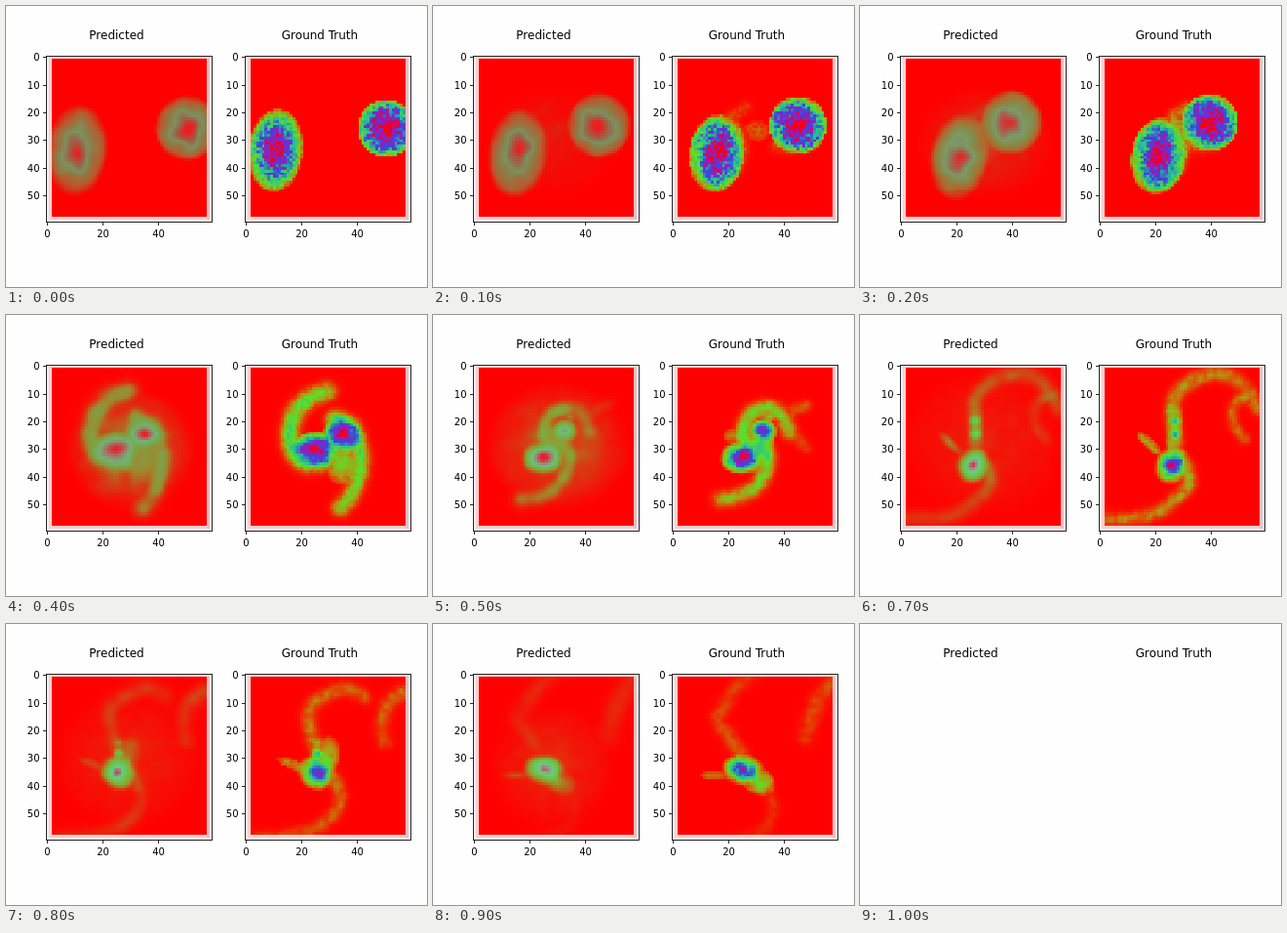
Recreate the animation shown at these times as an HTML page with a canvas. Size 432 by 288 pixels, loop 1.16 s.

```html
<!DOCTYPE html>
<html lang="en">
<head>
<meta charset="utf-8">
<title>Predicted and ground truth</title>
<style>
html, body { margin: 0; width: 100%; height: 100%; overflow: hidden; background: #fefefe; }
canvas { display: block; }
</style>
</head>
<body>
<canvas id="stage" width="432" height="288"></canvas>
<script>
const ctx = document.getElementById('stage').getContext('2d');
const N = 60, SIZE = 170, CELL = SIZE / N;
const STEP = 100, STEPS = 10, LOOP = 1160;
const KEY_STEPS = [0, 2, 4, 6, 7, 9];

// Bodies: cx, cy, rx, ry, tilt, peak, falloff
const core = [
  [10.5, 33.5, 10, 15, 0.1, 1, 0.6],
  [21, 35.5, 10, 14.5, 0.18, 1, 0.6],
  [24.5, 30, 9, 6.5, -0.1, 1, 0.6],
  [25.2, 35.7, 7.5, 6, 0, 1, 1.1],
  [26, 35.5, 6.5, 7.5, 0.5, 1, 1.1],
  [25.2, 34, 8, 6, 0.2, 0.88, 1]
];
const mate = [
  [50.5, 25.5, 10.5, 10.5, 0, 1, 0.42],
  [39.5, 23.5, 10.5, 10.5, 0, 1, 0.45],
  [35, 24.5, 7.5, 6, 0.4, 1, 0.6],
  [30, 22, 2.8, 2.8, 0, 0.72, 0.8],
  [26.7, 24.3, 2.5, 2.5, 0, 0.65, 0.8],
  [25, 32, 3, 3, 0, 0.3, 0.8]
];
const knot = [
  [50, 20, 2, 2, 0, 0, 0.8],
  [42, 20, 2, 2, 0, 0, 0.8],
  [38, 20, 2, 2, 0, 0, 0.8],
  [31, 16.5, 2.8, 2.6, 0, 0.62, 0.8],
  [26.4, 19.5, 2.5, 2.5, 0, 0.55, 0.8],
  [25, 29, 2, 2, 0, 0, 0.8]
];
const bridge = [
  [30, 28, 5, 4, 0, 0, 0.5],
  [30, 25, 5, 4, 0, 0.2, 0.5],
  [35, 34, 7, 9, 0, 0.3, 0.5],
  [26.5, 26, 5.5, 9, 0.3, 0.34, 0.5],
  [26.5, 22, 3.4, 12, 0, 0.27, 0.5],
  [30.5, 38, 7, 5, 0.5, 0.32, 0.6]
];
const wisp = [
  [20, 30, 3, 3, 0, 0, 0.5],
  [20, 30, 3, 3, 0, 0, 0.5],
  [22, 26, 3, 3, 0, 0, 0.5],
  [21, 24, 4.2, 3, 0.2, 0.32, 0.5],
  [17.8, 28, 6, 2, 0.75, 0.25, 0.5],
  [15, 36, 6, 1.8, 0, 0.15, 0.5]
];
const halo = [
  [25, 30, 22, 18, 0, 0, 0.7],
  [30, 31, 22, 18, 0, 0.16, 0.7],
  [30, 30, 21, 20, 0, 0.36, 0.8],
  [30, 28, 26, 22, 0, 0.08, 0.6],
  [30, 28, 26, 24, 0, 0.07, 0.6],
  [28, 33, 20, 20, 0, 0.09, 0.6]
];

// Arms: x, y pairs from root to tip, then width and peak
const upperArm = [
  [18, 40, 20, 33, 18, 26, 16, 22, 18, 20, 21, 18, 2, 0],
  [28, 40, 30, 33, 28, 26, 26, 22, 28, 20, 31, 18, 2, 0.22],
  [28, 34, 20, 34, 16, 27, 17, 18, 22, 12, 29, 9, 3, 0.48],
  [27, 30, 30, 16, 39, 8.5, 49, 12, 55, 22, 55, 38, 2.2, 0.3],
  [27, 27, 26, 14, 31, 6.5, 41, 2.5, 50, 5.5, 57, 15, 2.5, 0.21],
  [24, 28, 20, 22, 16, 16, 19, 10, 23, 4, 28, 0, 2.5, 0.1]
];
const lowerArm = [
  [49, 20, 55, 22, 57, 27, 54, 32, 47, 34, 42, 33, 2, 0],
  [38, 18, 44, 20, 46, 25, 43, 30, 36, 32, 31, 31, 2, 0.2],
  [32, 19, 38, 22, 41, 30, 41, 38, 38, 46, 34, 51, 2.8, 0.46],
  [30, 36, 30, 42, 25, 47, 17, 50, 8, 48, 0, 45, 2.3, 0.27],
  [31, 36, 32, 42, 28, 47, 21, 52.5, 11, 55, 0, 55, 2.3, 0.21],
  [32, 38, 36, 46, 34, 54, 28, 58, 18, 61, 8, 63, 2.3, 0.05]
];
const sideArm = [
  [44, 14, 40, 16, 40, 22, 44, 28, 2, 0],
  [44, 14, 40, 16, 40, 22, 44, 28, 2, 0],
  [44, 14, 40, 16, 40, 22, 44, 28, 2, 0],
  [52, 14, 46, 17, 46, 24, 52, 31, 1.8, 0.23],
  [55, 10, 49, 13, 48, 20, 52, 26, 2, 0.16],
  [58, 2, 53, 8, 50, 15, 48, 22, 3, 0.1]
];

// Colour ramps: position, r, g, b
const truthRamp = [
  [0, 255, 0, 0], [0.08, 225, 70, 5], [0.18, 180, 150, 20],
  [0.33, 90, 225, 40], [0.5, 40, 190, 150], [0.66, 60, 70, 220],
  [0.8, 150, 30, 190], [0.92, 220, 0, 80], [1, 255, 0, 0]
];
const earlyRamp = [
  [0, 255, 0, 0], [0.1, 228, 28, 14], [0.3, 185, 90, 45],
  [0.5, 142, 122, 70], [0.65, 125, 145, 95], [0.8, 155, 98, 72],
  [1, 235, 30, 30]
];
const lateRamp = [
  [0, 255, 0, 0], [0.1, 228, 45, 14], [0.3, 140, 165, 45],
  [0.5, 95, 205, 90], [0.65, 110, 200, 135], [0.8, 155, 140, 125],
  [1, 230, 30, 50]
];

const clamp = v => Math.max(0, Math.min(1, v));
const mix = (a, b, k) => a + (b - a) * k;
const mixAll = (a, b, k) => a.map((v, i) => mix(v, b[i], k));

function rand(x, y, seed) {
  let h = Math.imul(x, 374761393) ^ Math.imul(y, 668265263) ^ Math.imul(seed + 1, 1274126177);
  h = Math.imul(h ^ (h >>> 13), 1103515245);
  return ((h ^ (h >>> 16)) >>> 0) / 4294967296;
}

function smoothNoise(x, y, seed) {
  const ix = Math.floor(x), iy = Math.floor(y);
  const ease = t => t * t * (3 - 2 * t);
  const fx = ease(x - ix), fy = ease(y - iy);
  return mix(
    mix(rand(ix, iy, seed), rand(ix + 1, iy, seed), fx),
    mix(rand(ix, iy + 1, seed), rand(ix + 1, iy + 1, seed), fx), fy);
}

function at(keys, step) {
  let i = 0;
  while (i < KEY_STEPS.length - 2 && step >= KEY_STEPS[i + 1]) i++;
  const k = (step - KEY_STEPS[i]) / (KEY_STEPS[i + 1] - KEY_STEPS[i]);
  return mixAll(keys[i], keys[i + 1], k);
}

function ramp(stops, v) {
  let i = 0;
  while (i < stops.length - 2 && v > stops[i + 1][0]) i++;
  const a = stops[i], b = stops[i + 1];
  return mixAll(a, b, (v - a[0]) / (b[0] - a[0])).slice(1);
}

function bodyField([cx, cy, rx, ry, tilt, peak, fall], soft, swirl) {
  const c = Math.cos(tilt), s = Math.sin(tilt), grow = soft ? 1.12 : 1;
  return (x, y) => {
    const dx = x - cx, dy = y - cy;
    const u = (dx * c + dy * s) / (rx * grow), v = (dy * c - dx * s) / (ry * grow);
    const r = Math.hypot(u, v);
    if (r >= 1) return 0;
    const wave = swirl * Math.sin(2 * Math.atan2(v, u) + 8 * r) * r;
    return Math.max(0, peak * Math.pow(1 - r, fall + (soft ? 0.2 : 0)) + wave);
  };
}

function curve(p, t) {
  const n = p.length / 2 - 1, i = Math.min(n - 1, Math.floor(t * n)), f = t * n - i;
  const one = o => {
    const g = j => p[2 * Math.max(0, Math.min(n, j)) + o];
    const a = g(i - 1), b = g(i), c = g(i + 1), d = g(i + 2);
    return b + 0.5 * f * (c - a + f * (2 * a - 5 * b + 4 * c - d + f * (3 * (b - c) + d - a)));
  };
  return [one(0), one(1)];
}

function armField(key, soft) {
  const pts = key.slice(0, -2), [width, peak] = key.slice(-2);
  const w = width * (soft ? 1.25 : 1), count = 36, path = [];
  for (let i = 0; i <= count; i++) path.push(curve(pts, i / count));
  return (x, y) => {
    let best = 0;
    path.forEach(([px, py], i) => {
      const q = ((x - px) ** 2 + (y - py) ** 2) / (w * w);
      if (q < 6) best = Math.max(best, Math.exp(-q) * (1 - 0.4 * i / count));
    });
    return peak * best;
  };
}

function border(x, y) {
  if (x === 0 || x === N - 1 || y === N - 1) return [242, 238, 240];
  if (y === 0) return [248, 208, 204];
  if (x === N - 2) return [232, 192, 198];
  if (x === 1 || y === N - 2) return [250, 208, 206];
  return null;
}

function render(step, soft) {
  const swirl = !soft && step > 0 && step < 4 ? 0.1 : 0;
  const fields = [
    ...[core, mate].map(k => bodyField(at(k, step), soft, swirl)),
    ...[knot, bridge, wisp].map(k => bodyField(at(k, step), soft, 0)),
    ...[upperArm, lowerArm, sideArm].map(k => armField(at(k, step), soft))
  ];
  if (soft) fields.push(bodyField(at(halo, step), true, 0));
  const late = clamp((step - 1) / 5);
  const stops = soft ? earlyRamp.map((s, i) => mixAll(s, lateRamp[i], late)) : truthRamp;

  const tile = document.createElement('canvas');
  tile.width = tile.height = N;
  const g = tile.getContext('2d'), img = g.createImageData(N, N);
  for (let y = 0; y < N; y++) for (let x = 0; x < N; x++) {
    let d = Math.cbrt(fields.reduce((sum, f) => sum + f(x, y) ** 3, 0));
    const fine = rand(x, y, step), broad = smoothNoise(x / 1.8, y / 1.8, step);
    const grain = soft ? smoothNoise(x / 4, y / 4, step + 20) : mix(fine, broad, late);
    const amp = soft ? 0.6 : mix(0.85, 0.8, late);
    d = clamp(d * (1 + amp * (grain - 0.5) * (1.1 - 0.7 * clamp(d))));
    img.data.set([...(border(x, y) || ramp(stops, d)), 255], 4 * (y * N + x));
  }
  g.putImageData(img, 0, 0);
  return tile;
}

function label(text, x, y, size, align) {
  ctx.font = size + 'px "DejaVu Sans", sans-serif';
  ctx.textAlign = align;
  ctx.fillText(text, x, y);
}

function panel(tile, left) {
  const top = 51.5;
  ctx.imageSmoothingEnabled = false;
  ctx.drawImage(tile, left, top, SIZE, SIZE);
  ctx.fillStyle = '#000';
  ctx.strokeStyle = '#111';
  ctx.lineWidth = 0.9;
  ctx.strokeRect(left, top, SIZE, SIZE);
  ctx.beginPath();
  for (let v = 0; v < N; v += 10) {
    const p = (v + 0.5) * CELL, y = Math.floor(top + p) + 0.5;
    ctx.moveTo(left - 3.5, y);
    ctx.lineTo(left, y);
    label(v, left - 7, y + 3.5, 10, 'right');
    if (v % 20) continue;
    const x = Math.floor(left + p) + 0.5;
    ctx.moveTo(x, top + SIZE);
    ctx.lineTo(x, top + SIZE + 3.5);
    label(v, x, 237, 10, 'center');
  }
  ctx.stroke();
}

const tiles = [];
for (let i = 0; i < STEPS; i++) tiles.push([render(i, true), render(i, false)]);

function draw(step) {
  ctx.fillStyle = '#fefefe';
  ctx.fillRect(0, 0, 432, 288);
  ctx.fillStyle = '#000';
  label('Predicted', 113.5, 34, 12, 'center');
  label('Ground Truth', 322, 34, 12, 'center');
  if (step >= STEPS) return;
  panel(tiles[step][0], 41.5);
  panel(tiles[step][1], 245.5);
}

const start = performance.now();
function tick() {
  const t = (performance.now() - start) % LOOP;
  draw(Math.min(STEPS, Math.floor(t / STEP)));
  requestAnimationFrame(tick);
}
tick();
</script>
</body>
</html>
```
